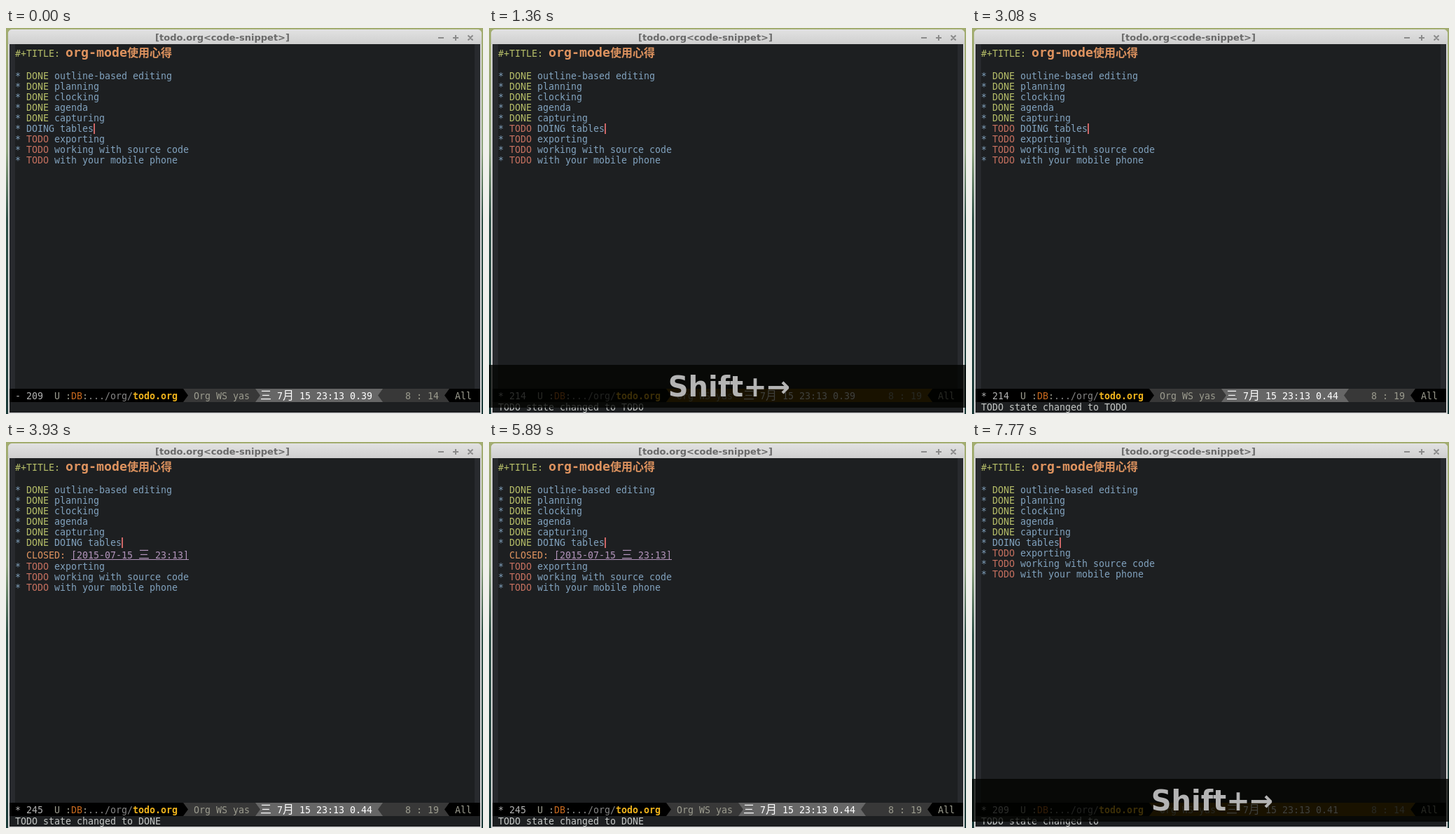
Animation, 681 px wide and 550 px high, one loop 8000 ms. Source, as an HTML page:

```html
<!DOCTYPE html>
<html lang="en">
<head>
<meta charset="utf-8">
<title>todo.org</title>
<style>
html, body { margin: 0; width: 100%; height: 100%; overflow: hidden; background: #1d1f21; }
svg { display: block; width: 681px; height: 550px; }
text { font: 13.29px 'DejaVu Sans Mono', 'Noto Sans CJK SC', monospace; white-space: pre; }
.cjk { font-family: 'Noto Sans CJK SC', 'Noto Sans CJK JP', sans-serif; font-size: 16px; }
.bold { font-weight: bold; }
.caption { font: bold 13px 'DejaVu Sans', sans-serif; fill: #696969; text-anchor: middle; }
.heading { font-size: 18.27px; font-weight: bold; }
.key { font-family: 'DejaVu Sans', sans-serif; font-weight: bold; fill: #b4b4b4; text-anchor: middle; }

.blue { fill: #81a2be; }
.green { fill: #b5bd68; }
.red { fill: #c5705f; }
.orange { fill: #de935f; }
.purple { fill: #b294bb; }
.plain { fill: #c5c8c6; }
.cursor { fill: #cc6666; }
.mode { fill: #9b9b8e; }

/* Every change is a hard cut on one shared 8 s timeline. */
.doing, .todo, .done, .again, .first, .edited, .replied, .load-a, .load-b, .load-c, .small, .big, .rest {
  animation: 8s step-end infinite;
}
.doing { animation-name: doing; }
.todo { animation-name: todo; }
.done { animation-name: done; }
.again { animation-name: again; }
.first { animation-name: first; }
.edited { animation-name: edited; }
.replied { animation-name: replied; }
.load-a { animation-name: load-a; }
.load-b { animation-name: load-b; }
.load-c { animation-name: load-c; }
.small { animation-name: small; }
.big { animation-name: big; }
.rest { animation-name: rest; }

@keyframes doing { 0% { visibility: visible } 14% { visibility: hidden } 86.875% { visibility: visible } }
@keyframes todo { 0% { visibility: hidden } 14% { visibility: visible } 48.5% { visibility: hidden } }
@keyframes done { 0% { visibility: hidden } 48.5% { visibility: visible } 86.875% { visibility: hidden } }
@keyframes again { 0% { visibility: hidden } 86.875% { visibility: visible } }
@keyframes first { 0% { visibility: visible } 14% { visibility: hidden } }
@keyframes edited { 0% { visibility: hidden } 14% { visibility: visible } 86.875% { visibility: hidden } }
@keyframes replied { 0% { visibility: hidden } 14% { visibility: visible } }
@keyframes load-a { 0% { visibility: visible } 35.5% { visibility: hidden } }
@keyframes load-b { 0% { visibility: hidden } 35.5% { visibility: visible } 97.125% { visibility: hidden } }
@keyframes load-c { 0% { visibility: hidden } 97.125% { visibility: visible } }
@keyframes small {
  0%, 15.875%, 50.75%, 88.625% { visibility: hidden }
  15.25%, 50.125%, 88% { visibility: visible }
}
@keyframes big {
  0%, 38.5%, 73.625% { visibility: hidden }
  15.875%, 50.75%, 88.625% { visibility: visible }
}
@keyframes rest { 0% { transform: none } 48.5% { transform: translateY(19px) } 86.875% { transform: none } }
</style>
</head>
<body>
<svg viewBox="0 0 681 550">
  <defs>
    <linearGradient id="desktop" x2="0" y2="1">
      <stop offset="0" stop-color="#a3ad70"/>
      <stop offset=".32" stop-color="#8fa580"/>
      <stop offset=".5" stop-color="#2f5148"/>
      <stop offset="1" stop-color="#1d3c3a"/>
    </linearGradient>
    <linearGradient id="bar" x2="0" y2="1">
      <stop offset="0" stop-color="#e2e2e2"/>
      <stop offset="1" stop-color="#cfcfcf"/>
    </linearGradient>
    <clipPath id="upper"><rect y="494" width="678" height="33"/></clipPath>
  </defs>

  <!-- window -->
  <rect width="681" height="550" fill="url(#desktop)"/>
  <path d="M3 550V8a6 6 0 0 1 6-6H673a6 6 0 0 1 6 6V550Z" fill="#d9d9d9"/>
  <path d="M3 23V8a6 6 0 0 1 6-6H673a6 6 0 0 1 6 6V23Z" fill="url(#bar)"/>
  <text class="caption" x="309" y="18">[todo.org&lt;code-snippet&gt;]</text>
  <path d="M617 14h8M638 14h8M642 10v8M659.5 10.5l7 7M666.5 10.5l-7 7" stroke="#8b8b8b" stroke-width="2" fill="none"/>
  <rect x="5" y="23" width="672" height="525" fill="#1d1f21"/>
  <path d="M5 23h8v491h-8zM669 23h8v491h-8z" fill="#282a2e"/>

  <!-- buffer -->
  <text class="green" x="13" y="41">#+TITLE: </text>
  <text class="heading orange" x="85" y="41">org-mode<tspan class="cjk">使用心得</tspan></text>
  <g class="blue">
    <text x="13" y="73">* <tspan class="green">DONE</tspan> outline-based editing</text>
    <text x="13" y="88">* <tspan class="green">DONE</tspan> planning</text>
    <text x="13" y="103">* <tspan class="green">DONE</tspan> clocking</text>
    <text x="13" y="118">* <tspan class="green">DONE</tspan> agenda</text>
    <text x="13" y="133">* <tspan class="green">DONE</tspan> capturing</text>
    <text x="13" y="148" class="doing">* DOING tables</text>
    <text x="13" y="148" class="todo">* <tspan class="red">TODO</tspan> DOING tables</text>
    <text x="13" y="148" class="done">* <tspan class="green">DONE</tspan> DOING tables</text>
    <g class="rest">
      <text x="13" y="163">* <tspan class="red">TODO</tspan> exporting</text>
      <text x="13" y="178">* <tspan class="red">TODO</tspan> working with source code</text>
      <text x="13" y="193">* <tspan class="red">TODO</tspan> with your mobile phone</text>
    </g>
  </g>
  <g class="done">
    <text class="orange" x="29" y="166">CLOSED: <tspan class="purple">[2015-07-15 <tspan class="cjk">三</tspan> 23:13]</tspan></text>
    <rect class="purple" x="93" y="167" width="168" height="1"/>
  </g>
  <g class="cursor">
    <rect class="doing" x="125" y="136" width="2" height="15"/>
    <rect class="edited" x="165" y="136" width="2" height="15"/>
  </g>

  <!-- mode line -->
  <rect x="5" y="514" width="672" height="19"/>
  <path id="middle" d="M253 514H633L626 523.5L633 533H253L260 523.5Z" fill="#383838"/>
  <path d="M356 514H538L531 523.5L538 533H356L363 523.5Z" fill="#666"/>
  <g fill="#644400">
    <path class="small" clip-path="url(#upper)" d="M253 514H633L626 523.5L633 533H253L260 523.5Z"/>
    <path class="big" d="M253 514H633L626 523.5L633 533H253L260 523.5Z"/>
  </g>
  <g fill="#b2b2b2">
    <text class="first" x="13" y="529">- 209</text>
    <text class="todo" x="13" y="529">* 214</text>
    <text class="done" x="13" y="529">* 245</text>
    <text class="again" x="13" y="529">* 209</text>
  </g>
  <text class="mode" x="69" y="529">U :<tspan fill="#c8691e">DB</tspan>:<tspan fill="#868686">.../org/</tspan><tspan class="bold" fill="#f0b41c">todo.org</tspan></text>
  <text class="mode" x="268" y="529">Org WS yas</text>
  <g fill="#fff">
    <text x="363" y="529"><tspan class="cjk">三</tspan> 7<tspan class="cjk">月</tspan> 15 23:13 0.</text>
    <text class="load-a" x="507" y="529">39</text>
    <text class="load-b" x="507" y="529">44</text>
    <text class="load-c" x="507" y="529">41</text>
  </g>
  <g class="mode">
    <text x="570" y="529">8 : 1</text>
    <text class="doing" x="610" y="529">4</text>
    <text class="edited" x="610" y="529">9</text>
    <text x="641" y="529">All</text>
  </g>

  <!-- echo area -->
  <g class="plain">
    <text class="replied" x="13" y="545">TODO state changed to</text>
    <text class="todo" x="189" y="545">TODO</text>
    <text class="done" x="189" y="545">DONE</text>
  </g>

  <!-- pressed keys -->
  <g class="small">
    <rect y="494" width="678" height="33" fill="#020300" fill-opacity=".76"/>
    <text class="key" x="340" y="519" style="font-size:23.6px">Shift+→</text>
  </g>
  <g class="big">
    <rect y="480" width="681" height="61" fill="#020300" fill-opacity=".76"/>
    <text class="key" x="343" y="525" style="font-size:40px">Shift+→</text>
  </g>
</svg>
</body>
</html>
```
